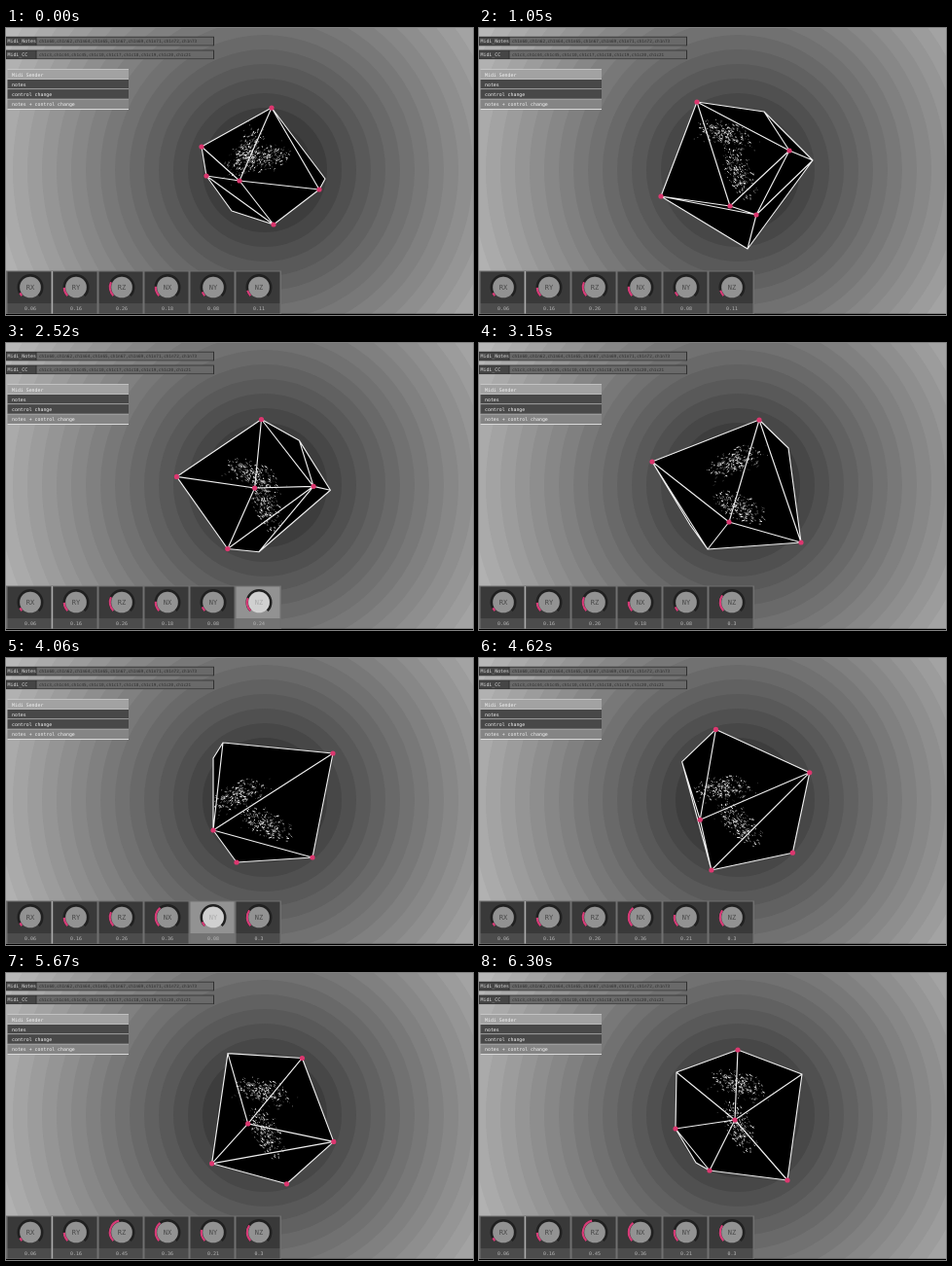
These frames come from a looping animation (480 px wide and 295 px high, 6.37 s). An HTML page:

```html
<!DOCTYPE html>
<html lang="en">
<head>
<meta charset="utf-8">
<title>Midi solid</title>
<style>
  html, body { margin: 0; width: 100%; height: 100%; overflow: hidden; background: #777; }
  svg { display: block; width: 100vw; height: 100vh; }
  text { font-family: "DejaVu Sans Mono", monospace; font-size: 4.9px; }
</style>
</head>
<body>
<svg id="stage" viewBox="0 0 480 295" preserveAspectRatio="none">
  <defs><clipPath id="inside"><path id="clip"/></clipPath></defs>
  <g id="backdrop"></g>
  <path id="solid" fill="#000"/>
  <g id="dust" clip-path="url(#inside)" fill="none"></g>
  <path id="edges" fill="none" stroke="#eee" stroke-width="1.15" stroke-linejoin="round"/>
  <g id="dots" fill="#dc376f"></g>
  <g id="panel"></g>
</svg>
<script>
const LOOP = 6370, STEP = 70, COUNT = 8;
const CX = 262, CY = 147;
const $ = id => document.getElementById(id);

function add(parent, tag, attrs, text) {
  const el = document.createElementNS("http://www.w3.org/2000/svg", tag);
  for (const k in attrs) el.setAttribute(k, attrs[k]);
  if (text !== undefined) el.textContent = text;
  parent.appendChild(el);
  return el;
}
const box = (p, x, y, width, height, fill) => add(p, "rect", { x, y, width, height, fill });
const label = (p, x, y, fill, text, more) => add(p, "text", { x, y, fill, ...more }, text);
const mix = (a, b, u) => a + (b - a) * u;
const clamp = v => Math.max(0, Math.min(1, v));

// One letter per corner sets its depth: m and M near, b and c fixed near,
// a and u turned away, h behind (no coordinates). The cloud is x, y, angle.
const fixedDepth = { h: -70, u: -30, a: -2, b: 22, c: 90 };
const poses = [];
function pose(time, kinds, cloud, coords) {
  let i = 0;
  const pts = [...kinds].map(k => {
    if (k === "h") return [0, 3, fixedDepth.h];
    const x = coords[i++] - CX, y = coords[i++] - CY;
    const near = 70 - 0.3 * Math.hypot(x, y) + (k === "M" ? 4 : 0);
    return [x, y, fixedDepth[k] ?? near];
  });
  poses.push({ time, pts, cloud });
}
pose(0, "mmmmmmuu", [246, 129, 118],
  [240,157, 201,122, 206,152, 275,202, 273,82, 322,166, 328,155, 232,188]);
pose(1050, "mmmmmuuu", [254, 110, 15],
  [258,183, 224,76, 187,173, 285,192, 319,126, 343,136, 293,86, 276,227]);
pose(1890, "mmmmMmuu", [246, 150, 68],
  [256,114, 238,84, 175,153, 258,208, 281,103, 350,148, 285,97, 284,210]);
pose(3150, "mmmumhuu", [264, 122, -25],
  [257,184, 288,79, 178,122, 217,187, 331,205, 318,108, 235,212]);
pose(4060, "mmumhuhm", [240, 141, -25],
  [315,205, 336,98, 223,87, 213,177, 213,103, 237,210]);
pose(5110, "ummmhuhm", [262, 129, 10],
  [314,185, 340,135, 269,90, 240,157, 205,110, 241,225]);
pose(6300, "mmacubab", [268, 115, 15],
  [237,203, 317,213, 332,104, 263,151, 223,195, 266,79, 203,102, 202,160]);

let seed = 41;
const rand = () => (seed = (seed * 16807) % 2147483647) / 2147483647;
const bell = () => (rand() + rand() + rand()) / 1.5 - 1;
const specks = Array.from({ length: 520 }, (_, i) => ({
  second: i % 2, shade: Math.floor(rand() * 3),
  x: bell() * 38, y: bell() * 17, len: 0.5 + rand() * rand() * 3, tilt: (rand() - 0.5) * 1.5
}));

// Each corner swings around the centre on its own arc
function swing(p, q, u) {
  const lp = Math.hypot(...p), lq = Math.hypot(...q);
  const dot = p.reduce((s, v, i) => s + v * q[i], 0) / (lp * lq);
  const w = Math.acos(Math.max(-0.999, Math.min(1, dot)));
  const s = Math.sin(w), r = mix(lp, lq, u);
  const ka = s < 0.01 ? 1 - u : Math.sin((1 - u) * w) / s;
  const kb = s < 0.01 ? u : Math.sin(u * w) / s;
  return p.map((v, i) => r * (ka * v / lp + kb * q[i] / lq));
}

// Triangles of the convex hull that face the viewer
function frontFaces(pts) {
  const out = [];
  for (let i = 0; i < COUNT; i++)
    for (let j = i + 1; j < COUNT; j++)
      for (let k = j + 1; k < COUNT; k++) {
        const a = pts[i];
        const [ux, uy, uz] = pts[j].map((v, n) => v - a[n]);
        const [vx, vy, vz] = pts[k].map((v, n) => v - a[n]);
        const nx = uy * vz - uz * vy, ny = uz * vx - ux * vz, nz = ux * vy - uy * vx;
        let above = 0, below = 0;
        pts.forEach((p, n) => {
          if (n === i || n === j || n === k) return;
          const d = (p[0] - a[0]) * nx + (p[1] - a[1]) * ny + (p[2] - a[2]) * nz;
          if (d > 0) above++; else below++;
        });
        if ((!above && nz > 0) || (!below && nz < 0)) out.push(nz > 0 ? [i, j, k] : [i, k, j]);
      }
  return out;
}

// Backdrop: stepped rings
box($("backdrop"), 0, 0, 480, 295, "rgb(184,184,184)");
for (let r = 304; r > 40; r -= 15) {
  const g = Math.round(54 + 130 * Math.pow(clamp((r - 55) / 250), 0.86));
  add($("backdrop"), "circle", { cx: 266, cy: 146, r, fill: `rgb(${g},${g},${g})` });
}

const dust = ["#666", "#aaa", "#f0f0f0"].map((stroke, i) =>
  add($("dust"), "path", { stroke, "stroke-width": 0.7 + i * 0.15 }));
const dots = Array.from({ length: COUNT }, () => add($("dots"), "circle", { r: 2.6 }));

// Controls
const panel = $("panel");
function field(y, name, value, size) {
  box(panel, 0, y, 214, 9.5, "#303030");
  box(panel, 0.5, y + 0.8, 30, 8, "#454545");
  box(panel, 31.5, y + 0.8, 181.5, 8, "#696969");
  label(panel, 1.5, y + 6.5, "#ddd", name);
  label(panel, 34, y + 6.5, "#303030", value, { style: `font-size:${size}px` });
}
field(8.8, "Midi_Notes",
  "ch1n60,ch1n62,ch1n64,ch1n65,ch1n67,ch1n69,ch1n71,ch1n72,ch1n73", 4.35);
field(22.6, "Midi_CC",
  "ch1c3,ch1c44,ch1c45,ch1c10,ch1c17,ch1c18,ch1c19,ch1c20,ch1c21", 4.25);

["Midi Sender", "notes", "control change", "notes + control change"].forEach((name, i) => {
  const y = 42.5 + i * 10.3;
  box(panel, 1.5, y, 124.5, 10.3, i === 0 ? "#a2a2a2" : i === 3 ? "#858585" : "#484848");
  box(panel, 1.5, y + 9.7, 124.5, 0.9, "#e4e4e4");
  label(panel, 6, y + 7, "#f2f2f2", name);
});
box(panel, 1.5, 42, 124.5, 0.8, "#ccc");

box(panel, 0, 293.8, 480, 1.2, "#000");
box(panel, 0, 249.5, 283, 44.5, "#707070");

// A knob is lit from on to off and its value climbs from t0 to t1
const knobs = [
  { name: "RX", low: 0.06 },
  { name: "RY", low: 0.16 },
  { name: "RZ", low: 0.26, high: 0.45, t0: 4950, t1: 5550, on: 4700, off: 5560 },
  { name: "NX", low: 0.18, high: 0.36, t0: 3570, t1: 3850, on: 3350, off: 3900 },
  { name: "NY", low: 0.08, high: 0.21, t0: 4150, t1: 4550, on: 3950, off: 4620 },
  { name: "NZ", low: 0.11, high: 0.3, t0: 2000, t1: 2700, on: 1680, off: 2800 }
];
const middle = { "text-anchor": "middle" };
const KNOB_Y = 266.5;

function arc(cx, value) {
  const r = 12.2, from = Math.PI * 0.75, to = from + Math.PI * 1.5 * value;
  const at = a => `${cx + r * Math.cos(a)} ${KNOB_Y + r * Math.sin(a)}`;
  return `M${at(from)}A${r} ${r} 0 ${value > 0.667 ? 1 : 0} 1 ${at(to)}`;
}

knobs.forEach((k, i) => {
  const x = 1.5 + i * 47, cx = x + 23.5;
  k.cx = cx;
  k.back = box(panel, x, 250.5, 45, 32.5);
  k.foot = box(panel, x, 283, 45, 10.5);
  add(panel, "path", { d: arc(cx, 1), stroke: "#202020", "stroke-width": 2.6, fill: "none" });
  k.arc = add(panel, "path", { stroke: "#d83c78", "stroke-width": 2.2, fill: "none" });
  k.disc = add(panel, "circle", { cx, cy: KNOB_Y, r: 10.8 });
  k.title = label(panel, cx, 269, "#444", k.name, { ...middle, style: "font-size:7px" });
  k.text = label(panel, cx, 290.2, "#b8b8b8", "", middle);
});
box(panel, 46.8, 250, 1, 43.5, "#bbb");

function drawKnobs(t) {
  for (const k of knobs) {
    const v = k.high ? mix(k.low, k.high, clamp((t - k.t0) / (k.t1 - k.t0)) ** 1.15) : k.low;
    const lit = t >= k.on && t < k.off;
    k.back.setAttribute("fill", lit ? "#929292" : "#393939");
    k.foot.setAttribute("fill", lit ? "#737373" : "#4c4c4c");
    k.disc.setAttribute("fill", lit ? "#d0d0d0" : "#929292");
    k.title.setAttribute("fill", lit ? "#aaa" : "#484848");
    k.arc.setAttribute("d", arc(k.cx, v));
    k.text.textContent = String(Math.round(v * 100) / 100);
  }
}

// Two drifting clouds of short strokes
function drawDust(a, b, u, t) {
  const [x1, y1, deg] = a.cloud.map((v, i) => mix(v, b.cloud[i], u));
  const y2 = 133 + 38 * Math.sin(Math.PI * t / 8000);
  const d = ["", "", ""];
  for (const s of specks) {
    const angle = (deg + s.second * 45) * Math.PI / 180;
    const ca = Math.cos(angle), sa = Math.sin(angle);
    const x = (s.second ? 266 : x1) + s.x * ca - s.y * sa;
    const y = (s.second ? y2 : y1) + s.x * sa + s.y * ca;
    const dx = s.len * Math.cos(angle + s.tilt), dy = s.len * Math.sin(angle + s.tilt);
    d[s.shade] += `M${x.toFixed(1)} ${y.toFixed(1)}l${dx.toFixed(1)} ${dy.toFixed(1)}`;
  }
  dust.forEach((p, i) => p.setAttribute("d", d[i]));
}

function draw(t) {
  let n = 0;
  while (n < poses.length - 2 && t >= poses[n + 1].time) n++;
  const a = poses[n], b = poses[n + 1];
  const u = clamp((t - a.time) / (b.time - a.time));
  const pts = a.pts.map((p, i) => swing(p, b.pts[i], u));
  const faces = frontFaces(pts);
  const seen = new Set(faces.flat());
  const spot = i => (CX + pts[i][0]).toFixed(2) + " " + (CY + pts[i][1]).toFixed(2);
  const path = faces.map(f => "M" + f.map(spot).join("L") + "Z").join("");
  for (const id of ["solid", "clip", "edges"]) $(id).setAttribute("d", path);
  dots.forEach((c, i) => {
    c.setAttribute("cx", CX + pts[i][0]);
    c.setAttribute("cy", CY + pts[i][1]);
    c.setAttribute("visibility", seen.has(i) && pts[i][2] > 0 ? "visible" : "hidden");
  });
  drawDust(a, b, u, t);
  drawKnobs(t);
}

const start = performance.now();
function tick() {
  const t = (performance.now() - start) % LOOP;
  draw(Math.floor(t / STEP) * STEP);
  requestAnimationFrame(tick);
}
tick();
</script>
</body>
</html>
```
